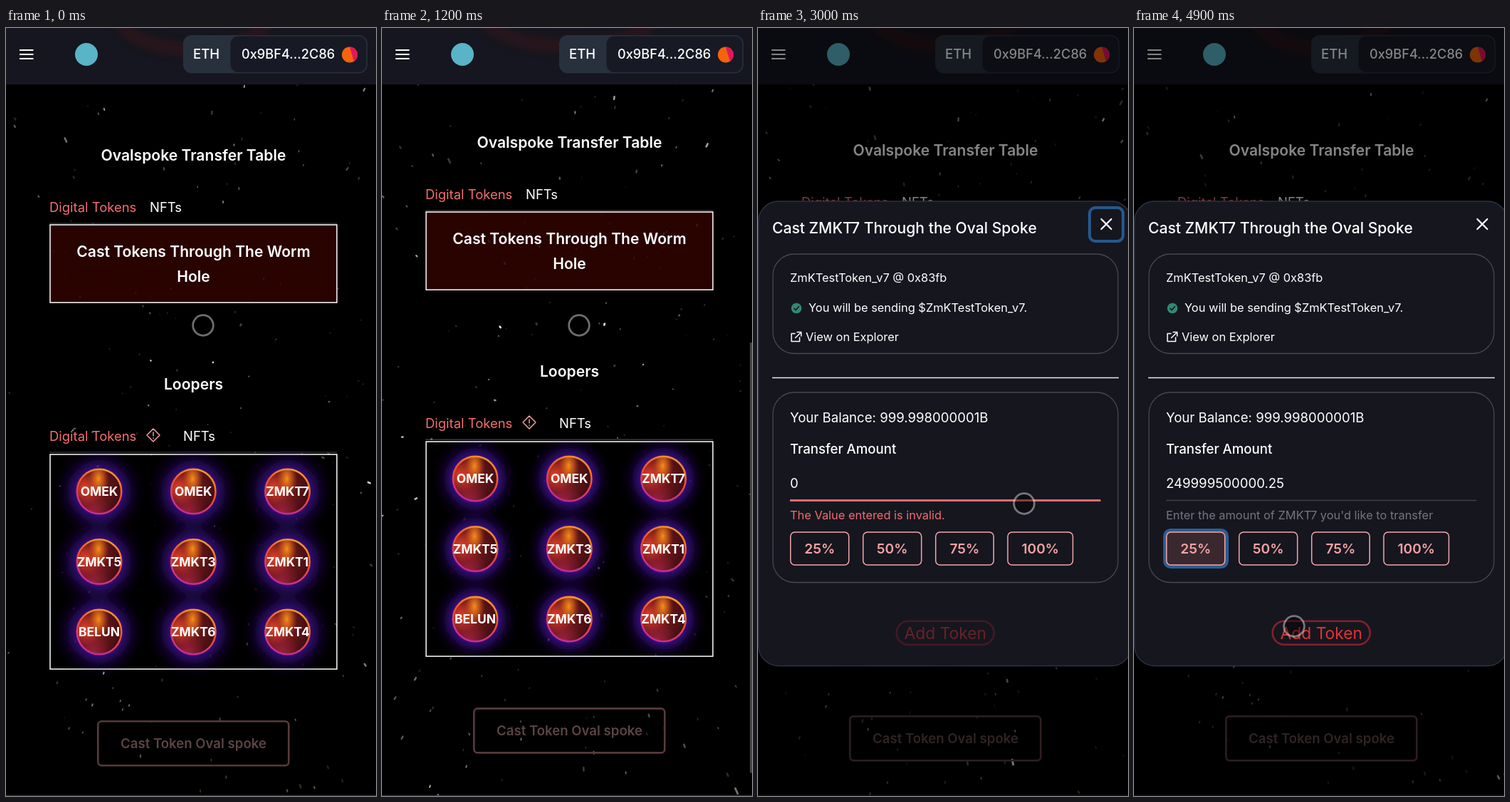
These frames come from a looping animation (520 px wide and 1077 px high, 5 s). An HTML page with a canvas:

```html
<!DOCTYPE html>
<html lang="en">
<head>
<meta charset="utf-8">
<title>Token transfer</title>
<style>
  html, body { margin: 0; width: 100%; height: 100%; overflow: hidden; background: #000; }
  canvas, svg { position: absolute; left: 0; top: 0; width: 520px; height: 1077px; }
  text { font-family: Inter, "Open Sans", sans-serif; fill: #fff; font-size: 18.6px; }
  .mid { text-anchor: middle; }
  .head { font-size: 21.1px; font-weight: 600; }
  .tab { font-size: 18.45px; }
  .on { fill: #f56f6f; }
  .small { font-size: 16.4px; }
  .label { font-size: 17.4px; font-weight: 700; text-anchor: middle; }
  .pct { font-size: 19.2px; font-weight: 600; fill: #f4a3a3; text-anchor: middle; }
  .line { fill: none; stroke: #fff; stroke-width: 1.5; stroke-linecap: round; stroke-linejoin: round; }
  .card { fill: none; stroke: #464753; stroke-width: 1.3; }
</style>
</head>
<body>
<canvas id="sky" width="520" height="1077"></canvas>
<svg viewBox="0 0 520 1077">
  <defs>
    <radialGradient id="body" cx=".3" cy=".45" r=".75">
      <stop offset="0" stop-color="#a8281e"/>
      <stop offset=".5" stop-color="#651618"/>
      <stop offset="1" stop-color="#3a0c12"/>
    </radialGradient>
    <radialGradient id="lit" cx=".16" cy=".42" r=".4">
      <stop offset="0" stop-color="#ee4a2a" stop-opacity=".8"/>
      <stop offset="1" stop-color="#dd3a2c" stop-opacity="0"/>
    </radialGradient>
    <radialGradient id="flare">
      <stop offset="0" stop-color="#f5901c"/>
      <stop offset=".5" stop-color="#d8641a" stop-opacity=".65"/>
      <stop offset="1" stop-color="#b04018" stop-opacity="0"/>
    </radialGradient>
    <radialGradient id="foot" cx=".35" cy="1" r=".45">
      <stop offset="0" stop-color="#b02648" stop-opacity=".8"/>
      <stop offset="1" stop-color="#b02648" stop-opacity="0"/>
    </radialGradient>
    <linearGradient id="rim" x1=".75" y1="0" x2=".35" y2="1">
      <stop offset="0" stop-color="#ffa21f"/>
      <stop offset=".45" stop-color="#f0502c"/>
      <stop offset="1" stop-color="#c42a9c"/>
    </linearGradient>
    <filter id="halo" x="-30%" y="-30%" width="160%" height="160%"><feGaussianBlur id="haloBlur" stdDeviation="5"/></filter>
    <filter id="soft" x="-50%" y="-100%" width="200%" height="300%"><feGaussianBlur stdDeviation="7"/></filter>
    <clipPath id="bar"><rect width="520" height="79.5"/></clipPath>
    <clipPath id="disc"><circle r="31"/></clipPath>
    <g id="planet">
      <circle r="31" fill="url(#body)"/>
      <circle r="31" fill="url(#lit)"/>
      <circle r="31" fill="url(#foot)"/>
      <ellipse cx="-1" cy="-18" rx="15" ry="27" fill="url(#flare)" clip-path="url(#disc)"/>
      <circle r="31.2" fill="none" stroke="url(#rim)" stroke-width="2.6"/>
      <path id="streak" d="M-33-19L-14-29M-30-15L-16-22" stroke="#f7b3b0" stroke-width="1.2"/>
    </g>
    <circle id="glow" r="36.5" fill="#5c12dc"/>
  </defs>

  <g id="page">
    <text class="head mid" x="263.5" y="186">Ovalspoke Transfer Table</text>
    <text class="tab on" x="61" y="258">Digital Tokens</text>
    <text class="tab" x="202" y="258">NFTs</text>
    <path d="M61 274H465M61 595H465" stroke="#4a4a4a" stroke-width="1.2"/>
    <rect x="62" y="276" width="403" height="109" fill="#320400" fill-opacity=".8" stroke="#fff" stroke-width="1.5"/>
    <text class="head mid" x="263.5" y="320.5">Cast Tokens Through The Worm</text>
    <text class="head mid" x="263.5" y="355.5">Hole</text>
    <text class="head mid" x="263.5" y="507">Loopers</text>
    <text class="tab on" x="61" y="579">Digital Tokens</text>
    <path class="line" style="stroke:#f3a0a0" d="M207 562L216 571L207 580L198 571ZM207 567V572M207 575V575.4"/>
    <text class="tab" x="249" y="579">NFTs</text>
    <rect x="62" y="598" width="403" height="301" fill="#000" fill-opacity=".55" stroke="#fff" stroke-width="1.5"/>
    <g id="halos" filter="url(#halo)"></g>
    <g id="tokens"></g>
    <rect x="129.3" y="972.3" width="268" height="62" rx="5" fill="none" stroke="#573a3b" stroke-width="2.6"/>
    <text class="mid" x="263.5" y="1010" style="font-weight:600;fill:#5d4344">Cast Token Oval spoke</text>
  </g>

  <g clip-path="url(#bar)">
    <rect width="520" height="79.5" fill="#15161f"/>
    <ellipse id="swirl" cx="263" cy="-22" rx="100" ry="48" fill="none" stroke="#6a1710" stroke-width="13" opacity=".33" filter="url(#soft)"/>
  </g>
  <path d="M19 31H38.5M19 37H38.5M19 43H38.5" stroke="#fff" stroke-width="2"/>
  <circle cx="113" cy="37" r="16" fill="#58b4c6"/>
  <rect x="249" y="10" width="259" height="53.5" rx="12" fill="#29303d"/>
  <rect x="315.5" y="11.5" width="191" height="50.5" rx="11" fill="#171a25"/>
  <text x="263" y="43" style="font-weight:500">ETH</text>
  <text x="331" y="43" style="font-weight:500;font-size:18.2px">0x9BF4...2C86</text>
  <circle cx="483" cy="37.5" r="11" fill="#f5640a"/>
  <path d="M483 26.5A11 11 0 0 1 489 46.7Z" fill="#e3155f"/>
  <rect y="1075.6" width="520" height="1.4" fill="#2c2d30"/>
  <rect id="thumb" x="517" width="3" height="604" rx="1.5" fill="#59595c" fill-opacity=".75"/>

  <g id="dialog">
    <rect width="520" height="1077" fill="#000" fill-opacity=".48"/>
    <rect x=".7" y="243" width="524" height="651.5" rx="28" fill="#16161f" stroke="#2b3344" stroke-width="1.3"/>
    <text x="20" y="288" style="font-size:21.1px;font-weight:500">Cast ZMKT7 Through the Oval Spoke</text>
    <rect id="closeRing" x="466" y="252" width="47" height="47" rx="8" fill="none" stroke="#27588c" stroke-width="4"/>
    <path class="line" style="stroke-width:2.2" d="M482.5 268L496.5 282M496.5 268L482.5 282"/>

    <rect class="card" x="21" y="317" width="485" height="139.5" rx="30"/>
    <text class="small" x="45" y="356">ZmKTestToken_v7 @ 0x83fb</text>
    <circle cx="54" cy="393" r="7.3" fill="#318873"/>
    <path class="line" style="stroke:#16161f" d="M50.8 393.3L53.2 395.6L57.4 390.6"/>
    <text class="small" x="71" y="397.5">You will be sending $ZmKTestToken_v7.</text>
    <path class="line" d="M52 428.5H47V439.5H58.5V434M55 426.5H60.7V432M60.5 426.7L52.5 434.5"/>
    <text class="small" x="67" y="438.5">View on Explorer</text>
    <path d="M20 490.5H507" stroke="#e8e8ea" stroke-width="1.4"/>

    <rect class="card" x="21" y="511" width="485" height="266.5" rx="30"/>
    <text x="45" y="552.5">Your Balance: 999.998000001B</text>
    <text x="45" y="597" style="font-weight:500">Transfer Amount</text>
    <text id="amount" x="45" y="645">0</text>
    <path id="rule" d="M45 662.5H481.5"/>
    <text id="hint" class="small" x="45" y="688.5"></text>
    <rect id="pctRing" x="43.5" y="704.5" width="87" height="51" rx="8" fill="#39292f" stroke="#2d5c92" stroke-width="5"/>
    <g id="shares"></g>
    <g id="add">
      <rect x="194.7" y="831.7" width="137" height="33" rx="16.5" fill="none" stroke="#84202a" stroke-width="2.6"/>
      <text class="mid" x="263.3" y="856.5" style="font-size:22.8px;fill:#e03434">Add Token</text>
    </g>
  </g>
  <circle id="cursor" r="14.3" fill="#000" fill-opacity=".42" stroke="#fff" stroke-opacity=".43" stroke-width="2.8"/>
</svg>
<script>
const LOOP = 5000, STEP = 100;
const $ = id => document.getElementById(id);
const set = (id, attrs) => { for (const k in attrs) $(id).setAttribute(k, attrs[k]); };

// Rows of [time, value, value...], eased between neighbours.
function track(rows, t) {
  const i = rows.findIndex(r => r[0] > t);
  if (i < 0) return rows[rows.length - 1].slice(1);
  if (i === 0) return rows[0].slice(1);
  const a = rows[i - 1], b = rows[i];
  const u = (t - a[0]) / (b[0] - a[0]), e = u * u * (3 - 2 * u);
  return a.slice(1).map((v, k) => v + (b[k + 1] - v) * e);
}

const scrollRows = [[0, 0], [100, 0], [600, 38], [900, 38], [1400, 7]];
const cursorRows = [
  [0, 277, 417], [1200, 277, 417], [1600, 264, 472], [2300, 403, 656], [2600, 407, 662],
  [2800, 405, 662], [3000, 374, 667], [3600, 90, 731], [3900, 87, 732],
  [4200, 128, 798], [4700, 222, 837], [4900, 225, 839]
];
const dialogRows = [[2700, 0], [2900, 1]];
const PICKED = 3800;

const names = ["OMEK", "OMEK", "ZMKT7", "ZMKT5", "ZMKT3", "ZMKT1", "BELUN", "ZMKT6", "ZMKT4"];
const spots = names.map((name, i) => [131 + 132.3 * (i % 3), 650 + 98.5 * Math.floor(i / 3), name]);
const useAll = id => spots.map(([x, y]) => `<use href="#${id}" x="${x}" y="${y}"/>`).join("");
$("halos").innerHTML = useAll("glow");
$("tokens").innerHTML = useAll("planet") +
  spots.map(([x, y, name]) => `<text class="label" x="${x}" y="${y + 6}">${name}</text>`).join("");

$("shares").innerHTML = [[45.7, 82], [147.7, 82], [249.7, 81.5], [351, 91.5]].map(([x, w], i) =>
  `<rect x="${x}" y="707" width="${w}" height="46" rx="6" fill="none" stroke="#f4a7a7" stroke-width="1.5"/>
   <text class="pct" x="${x + w / 2}" y="737">${25 * (i + 1)}%</text>`).join("");

let seed = 71;
const random = () => (seed = seed * 16807 % 2147483647) / 2147483647;
const stars = Array.from({ length: 420 }, () => ({
  x: (random() - .5) * 540, y: (random() - .5) * 1100, phase: random(), light: .2 + .8 * random() ** 2
}));
const sky = $("sky").getContext("2d");
sky.lineCap = "round";

function drawStars(t) {
  sky.clearRect(0, 0, 520, 1077);
  sky.strokeStyle = "#fff";
  for (const s of stars) {
    const z = 1.15 - (s.phase + t / LOOP) % 1;
    const near = 1.15 - z;
    const x = s.x / z, y = s.y / z;
    if (Math.abs(x) > 270 || Math.abs(y) > 550) continue;
    const tail = 1 - Math.min(.004 / z, .014);
    sky.globalAlpha = s.light * Math.min(1, .3 + near);
    sky.lineWidth = 1.5 + near * 1.5;
    sky.beginPath();
    sky.moveTo(262 + x, 540 + y);
    sky.lineTo(262 + x * tail, 540 + y * tail);
    sky.stroke();
  }
}

function render(t) {
  drawStars(t);
  const [scroll] = track(scrollRows, t);
  set("page", { transform: `translate(0 ${-scroll})` });
  set("thumb", { y: 431.5 + scroll * .52, opacity: t >= 100 && t < 2200 ? 1 : 0 });
  set("swirl", { rx: 105 + 18 * Math.sin(t / 900), cy: -22 + 4 * Math.cos(t / 700) });

  const pulse = .5 + .5 * Math.cos(2 * Math.PI * t / 1450);
  set("haloBlur", { stdDeviation: 4.5 + 10 * pulse });
  set("streak", { opacity: t >= 1500 && t < 1700 ? 1 : 0 });

  const picked = t >= PICKED;
  set("dialog", { opacity: track(dialogRows, t)[0] });
  set("closeRing", { opacity: picked ? 0 : 1 });
  set("pctRing", { opacity: picked ? 1 : 0 });
  set("add", { opacity: picked ? 1 : .4 });
  set("rule", { stroke: picked ? "#3d3e49" : "#ee6a6a", "stroke-width": picked ? 1.4 : 3 });
  $("amount").textContent = picked ? "249999500000.25" : "0";
  $("hint").textContent = picked ? "Enter the amount of ZMKT7 you'd like to transfer" : "The Value entered is invalid.";
  $("hint").style.fill = picked ? "#74757e" : "#f06c6c";

  const [x, y] = track(cursorRows, t);
  set("cursor", { cx: x, cy: y });
}

function tick() {
  render(Math.floor(performance.now() % LOOP / STEP) * STEP);
  requestAnimationFrame(tick);
}
tick();
</script>
</body>
</html>
```
